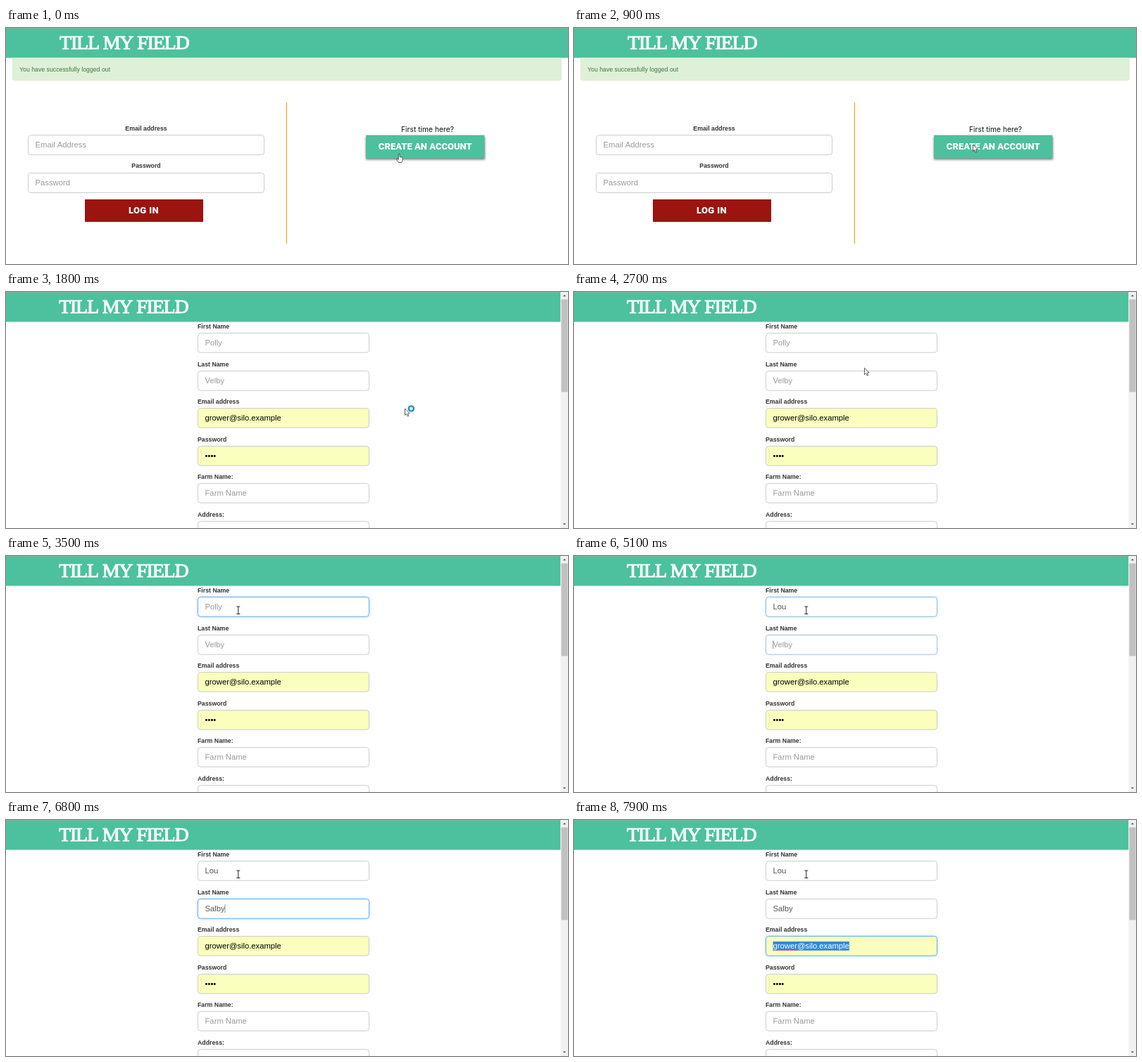
An HTML page with a canvas that plays this animation: 798 px wide and 336 px high, repeating every 8000 ms.

```html
<!DOCTYPE html>
<html lang="en">
<head>
<meta charset="utf-8">
<title>Sign up</title>
<style>
  html, body { margin: 0; width: 100%; height: 100%; overflow: hidden; background: #fff; }
  canvas { display: block; width: 798px; height: 336px; }
</style>
</head>
<body>
<canvas id="stage"></canvas>
<script>
const W = 798, H = 336, LOOP = 8000;
const canvas = document.getElementById('stage');
const ctx = canvas.getContext('2d');
const dpr = window.devicePixelRatio || 1;
canvas.width = W * dpr;
canvas.height = H * dpr;

const TEAL = '#4dc09d';
const SANS = '"Liberation Sans", Arial, sans-serif';
const BODY = '11.25px ' + SANS;
const LABEL = 'bold 8.75px ' + SANS;
const BUTTON = '900 13px Roboto, sans-serif';
const MENU = '7.5px "Open Sans", sans-serif';

const FIRST = 'Lou', LAST = 'Salby', EMAIL = 'grower@silo.example';
const FIRST_KEYS = [3800, 4200, 4400];
const LAST_KEYS = [5900, 6100, 6300, 6600, 6700];
const FOCUS = [2950, 5020, 7700, Infinity];
const CARET_RESETS = [3000, ...FIRST_KEYS, 5100, ...LAST_KEYS];

const clamp = v => Math.max(0, Math.min(1, v));
const ease = v => v * v * (3 - 2 * v);
const mix = (a, b, p) => a + (b - a) * p;
const typed = (word, keys, t) => word.slice(0, keys.filter(k => t >= k).length);
const rowOffset = i => Math.round(i * 53.5);

function rect(x, y, w, h, color) {
  ctx.fillStyle = color;
  ctx.fillRect(x, y, w, h);
}

function text(str, x, y, font, color, align = 'left', spacing = 0) {
  ctx.font = font;
  ctx.fillStyle = color;
  ctx.textAlign = align;
  ctx.letterSpacing = spacing + 'px';
  ctx.fillText(str, x, y);
}

function polygon(points, fill, stroke) {
  ctx.beginPath();
  points.forEach(([x, y]) => ctx.lineTo(x, y));
  ctx.closePath();
  ctx.fillStyle = fill;
  ctx.fill();
  if (stroke) {
    ctx.strokeStyle = stroke;
    ctx.lineWidth = 0.8;
    ctx.stroke();
  }
}

function header(x, width) {
  rect(0, 0, width, 42.5, TEAL);
  rect(0, 0, width, 1, '#83b898');
  const font = '28px "Liberation Serif", "Times New Roman", serif';
  text('TILL MY FIELD', x, 30, font, '#f6fffb', 'left', -1.2);
  ctx.strokeStyle = '#f6fffb';
  ctx.lineWidth = 1.1;
  ctx.strokeText('TILL MY FIELD', x, 30);
  ctx.letterSpacing = '0px';
}

function field(x, y, w, h, fill = '#fff', focus = 0) {
  ctx.beginPath();
  ctx.roundRect(x, y, w, h, 3.8);
  ctx.save();
  if (focus > 0) {
    ctx.shadowColor = `rgba(102,175,233,${0.6 * focus})`;
    ctx.shadowBlur = 4 * dpr;
  }
  ctx.fillStyle = fill;
  ctx.fill();
  ctx.restore();
  const channel = c => Math.round(mix(204, c, focus));
  ctx.strokeStyle = `rgb(${channel(102)},${channel(175)},${channel(233)})`;
  ctx.lineWidth = 1;
  ctx.stroke();
}

function loginPage(t) {
  header(76, W);

  ctx.beginPath();
  ctx.roundRect(9.5, 42.5, 779, 32, 2.5);
  ctx.fillStyle = '#dff0d8';
  ctx.fill();
  ctx.strokeStyle = '#d6e9c6';
  ctx.lineWidth = 0.7;
  ctx.stroke();
  text('You have successfully logged out', 19, 61.5, '8.75px ' + SANS, '#3c763d');

  rect(397.7, 106, 1.4, 201, '#e6b23c');

  text('Email address', 199, 145.5, LABEL, '#333', 'center');
  field(31.5, 152.5, 335, 28);
  text('Email Address', 41.5, 170.3, BODY, '#999');
  text('Password', 199, 199.2, LABEL, '#333', 'center');
  field(31.5, 206.5, 335, 28);
  text('Password', 41.5, 224, BODY, '#999');

  rect(112, 244, 168, 32, '#9c1410');
  text('LOG IN', 195.5, 264.2, BUTTON, '#fff', 'center', 0.4);

  text('First time here?', 598.5, 148, '10.3px Inter, sans-serif', '#111', 'center');
  ctx.save();
  ctx.shadowColor = 'rgba(0,0,0,.5)';
  ctx.shadowBlur = 3 * dpr;
  ctx.shadowOffsetY = 2 * dpr;
  rect(511, 152.5, 168.5, 33, TEAL);
  ctx.restore();
  text('CREATE AN ACCOUNT', 595.3, 173.3, BUTTON, '#fff', 'center');

  if (t >= 1400 && t < 1600) {
    text('Waiting for till-my-field.stand-in.example...', 2, 332, '8px "Open Sans", sans-serif', '#777');
  }
}

function scrollbar() {
  rect(787.5, 0, 10.5, H, '#f1f1f1');
  rect(788.5, 10.5, 9, 132, '#c1c1c1');
  polygon([[790.8, 6.3], [793, 4], [795.2, 6.3]], '#555');
  polygon([[790.8, 329.5], [793, 331.8], [795.2, 329.5]], '#555');
}

function menu(y, suggestion, settings) {
  rect(271, y, 246, settings ? 30.5 : 16, '#fff');
  text(suggestion, 277, y + 9.2, 'bold ' + MENU, '#111');
  rect(272, y + 14, 243, 1, '#aaa');
  if (settings) text('Tavlon Autofill settings...', 277, y + 24.3, MENU, '#444');
}

function caret(str, y, t) {
  const last = Math.max(...CARET_RESETS.filter(k => t >= k));
  if ((t - last) % 1000 >= 500) return;
  ctx.font = BODY;
  rect(282.4 + ctx.measureText(str).width, y - 9.7, 0.8, 12, '#777');
}

function selectedEmail(y) {
  ctx.font = BODY;
  rect(282.5, y - 10, ctx.measureText(EMAIL).width, 12.8, '#3089dc');
  rect(282.5, y + 2, ctx.measureText('grower').width, 0.9, '#c9627f');
  text(EMAIL, 282.5, y, BODY, '#fff');
}

function signupPage(t) {
  header(75, 787.5);
  const first = typed(FIRST, FIRST_KEYS, t);
  const last = typed(LAST, LAST_KEYS, t);
  const rows = [
    ['First Name', 'Polly', first],
    ['Last Name', 'Velby', last],
    ['Email address', '', EMAIL, true],
    ['Password', '', '••••', true],
    ['Farm Name:', 'Farm Name', ''],
    ['Address:', 'Address', '']
  ];
  const baseline = i => 76 + rowOffset(i);

  rows.forEach(([label, hint, value, filled], i) => {
    const y = rowOffset(i);
    const ramp = start => ease(clamp((t - start) / 200));
    const focus = i < 3 ? ramp(FOCUS[i]) - ramp(FOCUS[i + 1]) : 0;
    text(label, 272, 51.6 + y, LABEL, '#333');
    field(272.5, 58.5 + y, 243, 27.7, filled ? '#faffbd' : '#fff', focus);
    if (i === 2 && t >= FOCUS[2]) selectedEmail(baseline(i));
    else text(value || hint, 282.5, baseline(i), BODY, filled ? '#000' : value ? '#555' : '#999');
  });

  if (t >= 3000 && t < FOCUS[1]) caret(first, baseline(0), t);
  else if (t >= FOCUS[1] && t < FOCUS[2]) caret(last, baseline(1), t);

  if (t >= 3800 && t < 4900) menu(87, FIRST, false);
  if (t >= 5900 && t < 6100) menu(141, 'Sornley', true);
  scrollbar();
}

function arrow(x, y) {
  polygon([[0, 0], [0, 9.5], [2.2, 7.6], [3.8, 11], [5.4, 10.3], [3.9, 7], [6.8, 6.8]]
    .map(([dx, dy]) => [x + dx, y + dy]), '#fff', '#333');
}

function hand(x, y) {
  polygon([[-1, 0], [0.6, 0], [0.9, 4], [4.4, 5], [5, 6], [4.6, 9.5], [3.6, 12],
    [-1, 12], [-3.8, 8], [-3.6, 6.8], [-1, 8]]
    .map(([dx, dy]) => [x + dx, y + dy]), '#fff', '#333');
}

function iBeam(x, y) {
  rect(x - 0.5, y - 5, 1, 10, '#222');
  rect(x - 2.5, y - 5.5, 5, 1, '#222');
  rect(x - 2.5, y + 5, 5, 1, '#222');
}

function pointer(t) {
  if (t < 900) {
    const p = ease(clamp(t / 500));
    hand(mix(558.3, 566, p), mix(179.3, 167, p));
    return;
  }
  const p = ease(clamp((t - 2400) / 500));
  const x = mix(566.5, 329.8, p), y = mix(166, 77, p);
  const overField = x > 272 && x < 515 && (y < 86 || (y > 112 && y < 140));
  if (overField) iBeam(x, y);
  else arrow(x, y);
  if (t >= 1800 && t < 2400) {
    ctx.beginPath();
    ctx.arc(575.3, 166, 3.6, 0, Math.PI * 2);
    ctx.fillStyle = '#d8f0fb';
    ctx.fill();
    ctx.strokeStyle = '#2293cd';
    ctx.lineWidth = 2.4;
    ctx.stroke();
  }
}

const start = performance.now();

function draw() {
  const t = (performance.now() - start) % LOOP;
  ctx.setTransform(dpr, 0, 0, dpr, 0, 0);
  rect(0, 0, W, H, '#fff');
  if (t < 1800) loginPage(t);
  else signupPage(t);
  pointer(t);
  requestAnimationFrame(draw);
}

draw();
</script>
</body>
</html>
```
